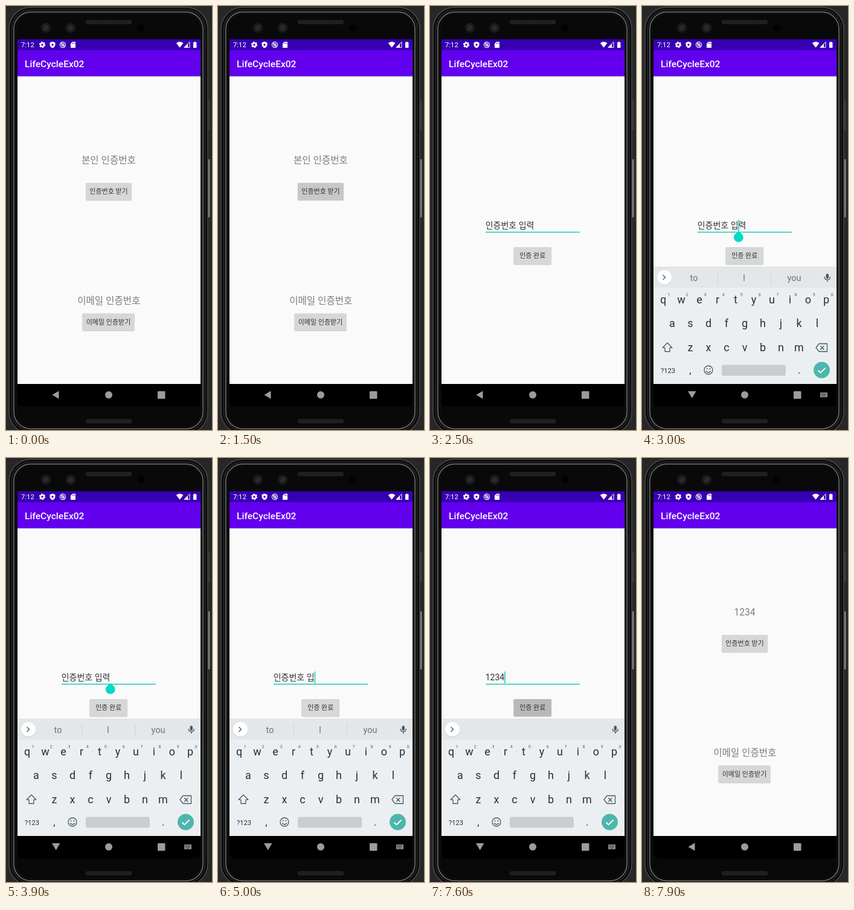
Recreate the animation shown at these times as an HTML page. Size 341 by 700 pixels, loop 8000 ms.

```html
<!DOCTYPE html>
<html lang="ko">
<head>
<meta charset="utf-8">
<style>
html, body { margin: 0; width: 100%; height: 100%; overflow: hidden; background: #272728; }
svg { display: block; width: 100vw; height: 100vh; }
text { font-family: Roboto, "Noto Sans CJK KR", sans-serif; white-space: pre; }
.mid { text-anchor: middle; }
.line { fill: none; stroke: #455a64; stroke-width: 1.3; stroke-linejoin: round; stroke-linecap: round; }
</style>
</head>
<body>
<svg id="stage" viewBox="0 0 341 700" preserveAspectRatio="none"></svg>
<script>
const rect = (x, y, w, h, fill, more = '') =>
  `<rect x="${x}" y="${y}" width="${w}" height="${h}" fill="${fill}" ${more}/>`;
const dot = (x, y, r, fill, more = '') => `<circle cx="${x}" cy="${y}" r="${r}" fill="${fill}" ${more}/>`;
const path = (d, more = '') => `<path d="${d}" ${more}/>`;
const label = (s, x, y, size, fill, more = 'class="mid"') =>
  `<text x="${x}" y="${y}" font-size="${size}" fill="${fill}" ${more}>${s}</text>`;

const button = (id, s, x, y, w, h) =>
  rect(x, y + 1, w, h, '#000', 'rx="2" opacity=".16"') +
  rect(x - .5, y + .3, w + 1, h, '#000', 'rx="2" opacity=".06"') +
  rect(x, y, w, h, '#d6d7d7', 'rx="1.5"') +
  rect(x, y, w, h, '#000', `rx="1.5" id="${id}" opacity="0"`) +
  label(s, x + w / 2, y + 18, 11, '#333');

const page = (id, body) => `<g id="${id}">
  ${rect(19, 100, 303, 530, '#fafafa')}
  ${rect(19, 116, 303, 1, '#000', 'opacity=".12"')}${rect(19, 117, 303, 1, '#000', 'opacity=".04"')}
  ${rect(19, 55, 303, 30, '#3700b3')}${rect(19, 73, 303, 43, '#6200ee')}
  ${label('LifeCycleEx02', 31, 100.6, 15.55, '#fff', 'font-weight="500"')}
  ${body}${rect(19, 624, 303, 37, '#000')}</g>`;

const speaker = y => rect(132, y, 76, 7, '#242424', 'rx="3.5"') +
  path(`M134 ${y + 2}H206M134 ${y + 5}H206`, 'stroke="#0c0c0c" stroke-dasharray="1.5 1"');

const camera = x => dot(x, 36, 8.5, '#18181a') + dot(x, 36, 5.5, '#222428') +
  path(`M${x - 3} 39l6-6`, 'stroke="#34373c" stroke-width="1.5"');

const shell = (inset, fill, stroke, width) =>
  rect(5 + inset, 2 + inset, 329 - 2 * inset, 704 - 2 * inset, fill,
    `rx="${36 - inset}" stroke="${stroke}" stroke-width="${width}"`);

const phone =
  rect(334.5, 155, 3, 50, '#3a3a3a', 'rx="1"') +
  rect(334.5, 253, 3, 96, '#808080', 'rx="1"') +
  shell(0, '#0c0c0c', '#4d4d4d', 1.4) + shell(4.5, '#0c0c0c', '#222', 2) +
  shell(8, '#060606', '#757575', 1.5) + shell(11, '#09090a', '#111', 1.5) +
  speaker(23) + speaker(682) + camera(66) + camera(107) + dot(223, 36, 6, '#020203');

const statusIcons =
  label('7:12', 25, 68.2, 11.3, '#fff', '') +
  dot(60, 64, 2.9, 'none', 'stroke="#fff" stroke-width="2.3"') +
  dot(60, 64, 4.5, 'none', 'stroke="#fff" stroke-width="1.5" stroke-dasharray="2.36 2.36"') +
  path('M77 58.8l4.5 1.8v3.2q0 3.8-4.5 5.7q-4.5-1.9-4.5-5.7v-3.2z', 'fill="#fff"') +
  dot(77, 64, 1.7, '#3700b3') +
  dot(94, 64, 4.6, 'none', 'stroke="#fff" stroke-width="1.1"') +
  dot(94, 64, 2.2, 'none', 'stroke="#fff" stroke-width="1.1"') +
  path('M90.5 60.5l7 7', 'stroke="#fff" stroke-width="1.1"') +
  path('M110 59h5v10h-8v-7z', 'fill="#fff"') +
  path('M110.3 60.5v2M112 60.5v2M113.7 60.5v2', 'stroke="#3700b3" stroke-width=".8"') +
  path('M281.8 61.3q5.8-4.4 11.6 0l-5.8 7.4z', 'fill="#fff"') +
  path('M295 68.4h9v-9z', 'fill="none" stroke="#fff"') + path('M295 68.4h6v-6z', 'fill="#fff"') +
  path('M310 60h1.5v-1h2.4v1h1.5v9h-5.4z', 'fill="#fff"');

const GREY = '#9c9c9c';
const navIcons =
  path('M76.5 642l11-6.5v13z', `fill="${GREY}" id="back"`) +
  `<g id="down">${path('M76 636h13.5l-6.7 11.5z', `fill="${GREY}"`)}
   ${rect(295, 638, 12, 8, '#8a8a8a', 'rx="1"')}
   ${path('M296.5 640h9M296.5 642h9M298.5 644.3h5', 'stroke="#000" stroke-width=".9" stroke-dasharray="1 .8"')}</g>` +
  dot(170, 642, 6, GREY) + rect(251, 636, 12.5, 12.5, GREY, 'rx="1"');

const KEY = '#1f333c';
const row = (keys, x, y) => [...keys].map((k, i) => label(k, x + 30 * i, y, 18, KEY)).join('');
const keyboard =
  rect(19, 431, 303, 193, '#eceff1') + rect(19, 431, 303, 34, '#e4e7e9') +
  rect(19, 430.5, 303, 1, '#d9dcde') +
  dot(37, 449, 12, '#000', 'opacity=".13"') + dot(37, 448, 12, '#fff') +
  path('M35 444.5l3.5 3.5l-3.5 3.5', 'class="line"') +
  `<g id="words">${['to', 'I', 'you'].map((w, i) => label(w, 86 + 83 * i, 454, 14.5, '#66747b')).join('')}
   ${rect(125, 439, 1, 20, '#cfd4d7')}${rect(213, 439, 1, 20, '#cfd4d7')}</g>` +
  rect(304.6, 442, 4.4, 8, '#455a64', 'rx="2.2"') +
  path('M302.4 447.5q0 4.3 4.4 4.3t4.4-4.3M306.8 452v2.5', 'class="line"') +
  row('qwertyuiop', 35, 490.5) + row('asdfghjkl', 50, 529.5) + row('zxcvbnm', 80, 569.5) +
  [...'1234567890'].map((d, i) => label(d, 44.5 + 30 * i, 478.5, 7.5, '#546770')).join('') +
  path('M42 556l8 8.2h-4v6.3h-8v-6.3h-4z', 'class="line"') +
  path('M293 557.5h13.5v13h-13.5l-5-6.5zM295.5 561.5l5.5 5.5m0-5.5l-5.5 5.5', 'class="line"') +
  label('?123', 43, 605.5, 11.2, KEY) + label(',', 80, 606.5, 17, KEY) + label('.', 260, 606.5, 17, KEY) +
  dot(110, 601, 7, 'none', 'class="line"') + path('M106.5 603q3.5 4 7 0', 'class="line"') +
  dot(107.6, 599, 1, '#455a64') + dot(112.4, 599, 1, '#455a64') +
  rect(132, 592.5, 106, 18, '#c8cdd0', 'rx="3"') +
  dot(297.5, 601, 13.5, '#4db6ac') +
  path('M291.5 601.5l4 4l8-8', 'fill="none" stroke="#fff" stroke-width="1.8"');

const home = page('home',
  label('', 170, 259.5, 15.6, '#7c7c7c', 'class="mid" id="result"') +
  button('press1', '인증번호 받기', 132, 292, 76, 28.5) +
  label('이메일 인증번호', 170.3, 491.5, 15.6, '#7c7c7c') +
  button('press2', '이메일 인증받기', 126.5, 507.5, 86, 28.5));

const TEAL = '#18cbbb';
const code = page('code',
  label('', 91.7, 367, 14, '#303030', 'id="entry"') +
  rect(92, 372.7, 156, 1, '#777', 'id="under"') +
  rect(0, 352.5, 1.6, 19.5, TEAL, 'id="caret"') +
  path('M0 372L5.6 376.4A7.9 7.9 0 1 1-5.6 376.4Z', 'fill="#00dac5" id="handle"') +
  button('press3', '인증 완료', 138.5, 398, 62.5, 28.5));

const stage = document.getElementById('stage');
stage.innerHTML = `<defs>
  <clipPath id="screen">${path('M19 55H322V652q0 9-9 9H28q-9 0-9-9z')}</clipPath>
  <clipPath id="above">${rect(19, 55, 303, 569, '#000')}</clipPath></defs>
  ${rect(0, 0, 341, 700, '#272728')}${phone}
  <g clip-path="url(#screen)">${home}${rect(19, 55, 303, 606, '#000', 'id="dim"')}${code}
  <g clip-path="url(#above)"><g id="keys">${keyboard}</g></g>${statusIcons}${navIcons}</g>`;

const el = id => document.getElementById(id);
const set = (id, attrs) => { for (const k in attrs) el(id).setAttribute(k, attrs[k]); };
const show = (id, on) => set(id, { opacity: +on });
const span = (t, a, b) => Math.min(1, Math.max(0, (t - a) / (b - a)));
const easeOut = (u, n) => 1 - (1 - u) ** n;
const zoom = s => `translate(170.5 358) scale(${s}) translate(-170.5 -358)`;
const within = (t, ...spans) => spans.some(([a, b]) => t >= a && t < b);

const HINT = '인증번호 입력';
const edits = [[0, HINT], [4900, HINT.slice(0, 6)], [5300, HINT.slice(0, 4)], [5400, HINT.slice(0, 2)],
  [5500, ''], [6200, '12'], [6300, '123'], [6500, '1234']];

function draw(t) {
  const open = easeOut(span(t, 1690, 2000), 4.8);
  const close = easeOut(span(t, 7640, 7900), 4);
  const closing = t >= 7700;

  set('home', { transform: zoom(closing ? 1 + .1 * (1 - close) : 1 + .048 * open) });
  set('code', {
    transform: zoom(closing ? 1 - .1 * close : .85 + .15 * open),
    opacity: closing ? 1 - span(t, 7650, 7780) : span(t, 1670, 1750)
  });
  set('dim', { opacity: within(t, [1700, 2000]) ? .2 * span(t, 1670, 1750) : 0 });
  el('result').textContent = t < 7650 ? '본인 인증번호' : '1234';

  set('press1', { opacity: t < 2000 ? .14 * span(t, 1400, 1600) : 0 });
  set('press3', { opacity: .14 * span(t, 7300, 7500) });

  const entry = el('entry');
  entry.textContent = edits.filter(e => e[0] <= t).pop()[1];
  const end = 92 + (entry.textContent ? entry.getComputedTextLength() : 0);
  const slide = span(t, 3400, 3800);
  const spot = t < 4900 ? end - 13 * (1 - slide) : end;
  set('caret', {
    x: t < 3600 ? end - 13.5 : end - .3,
    opacity: +within(t, [2600, 3100], [3500, 3900], [4400, 6000], [6200, 6900], [7400, 8000])
  });
  set('handle', { transform: `translate(${spot})`, opacity: +within(t, [2600, 4900]) });
  const focused = t >= 2500;
  set('under', { fill: focused ? TEAL : '#777', height: focused ? 1.5 : 1 });

  const up = easeOut(span(t, 2600, 2900), 2) * (1 - span(t, 7600, 7800));
  set('keys', { transform: `translate(0 ${40 * (1 - up)})`, opacity: up });
  show('words', within(t, [3000, 5300]));
  const typing = within(t, [2600, 7700]);
  show('down', typing);
  show('back', !typing);
}

function tick(now) {
  draw(Math.floor(now % 8000 / 100) * 100);
  requestAnimationFrame(tick);
}
draw(0);
requestAnimationFrame(tick);
</script>
</body>
</html>
```
